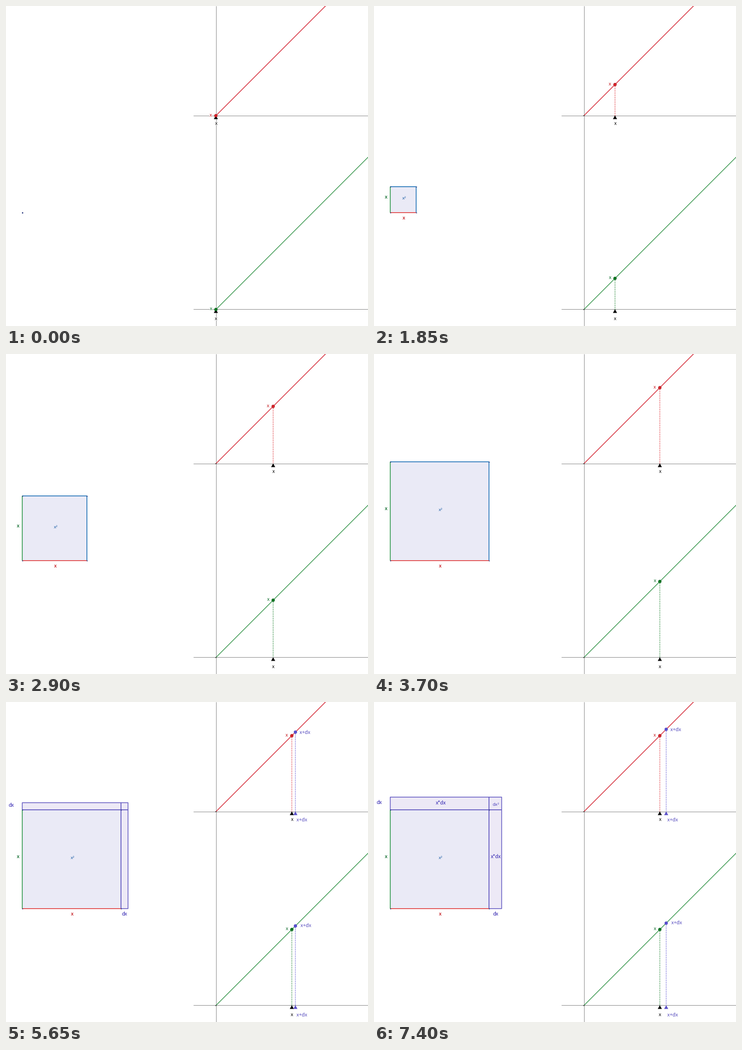
A matplotlib script for the animation above (8 s loop, 796 by 703 pixels).

```python
import matplotlib.pyplot as plt
from matplotlib import patheffects
from matplotlib.animation import FuncAnimation
from matplotlib.patches import Circle, Polygon, Rectangle

W, H, DPI = 796, 703, 64
PT = 72 / DPI                        # points per pixel
STEP, FRAMES, HOLD = 50, 160, 12     # ms, frames per loop, still frames at the start
LAST = 136                           # last moving step

AXIS_X = 461.5
BASES = (241.0, 666.8)               # baselines of the two graphs
SQ_X, SQ_Y = 35.7, 453.9             # lower left corner of the square
X_MAX, X_STEPS = 167.0, 61
DX_MAX, DX_START, DX_STEPS = 14.0, 74, 48

RED, GREEN, BLUE, VIOLET = "#dc2329", "#0f7a22", "#1a6fb5", "#5146bd"
RED_TEXT, GREEN_TEXT, BLUE_TEXT = "#c41a20", "#0b6a2a", "#1d5fa6"
AXIS = "#828282"

plt.rcParams["font.family"] = "Noto Sans CJK JP"
plt.rcParams["text.hinting"] = "none"

fig = plt.figure(figsize=(W / DPI, H / DPI), dpi=DPI, facecolor="white")
ax = fig.add_axes([0, 0, 1, 1])
ax.set_xlim(0, W)
ax.set_ylim(H, 0)
ax.axis("off")


def line(color, width, z, xs=(), ys=(), snap=False, **kw):
    kw.setdefault("solid_capstyle", "butt")
    return ax.plot(xs, ys, color=color, lw=width * PT, zorder=z, snap=snap, **kw)[0]


def label(text, color, ha="center", halo=False, size=10.8, **kw):
    t = ax.text(0, 0, text, color=color, ha=ha, va="baseline",
                fontsize=size * PT, zorder=9, **kw)
    if halo:
        t.set_path_effects([patheffects.withStroke(linewidth=2.5 * PT,
                                                   foreground="white")])
    return t


def squared(text, color, ha="center"):
    return label(text, color, ha, size=9.4, family="DejaVu Sans")


def side(u):
    """Side of the square for a distance u along the graph."""
    return 0.1006 * u ** 1.5


class Marker:
    """Point on a graph with its dotted drop line, triangle and labels."""

    def __init__(self, base, color, edge, tri_color, z):
        self.base = base
        self.drop = line(color, 1.6, z, ls=(0, (1, 1.45)))
        self.tri = ax.add_patch(Polygon([(0, 0)] * 3, color=tri_color, lw=0, zorder=z + 1))
        self.dot = ax.add_patch(Circle((0, 0), 3.2, fc=color, ec=edge,
                                       lw=0.8 * PT, zorder=z + 2))

    def add_labels(self, text, color, foot_color, offset, foot, ha):
        self.text = label(text, color, ha, True)
        self.foot = label(text, foot_color, ha, True)
        self.offset, self.foot_offset = offset, foot

    def place(self, u, shown=True):
        x, b = AXIS_X + u, self.base
        y = b - u
        self.drop.set_data([x, x], [y, b])
        self.tri.set_xy([(x, b - 0.6), (x - 4.5, b + 7.5), (x + 4.5, b + 7.5)])
        self.dot.center = x, y
        self.text.set_position((x + self.offset[0], y + self.offset[1]))
        self.foot.set_position((x + self.foot_offset[0], b + self.foot_offset[1]))
        for part in (self.drop, self.tri, self.dot, self.text, self.foot):
            part.set_visible(shown)


# Axes and diagonals
line(AXIS, 1, 1, [AXIS_X, AXIS_X], [0, H], snap=True)
for base, color in zip(BASES, ("#d62f3c", "#3f9a53")):
    row = base - 0.4
    line(AXIS, 1, 1, [412, W], [row, row], snap=True)
    line(color, 1.6, 2, [AXIS_X, AXIS_X + 400], [base, base - 400])
    ax.add_patch(Circle((AXIS_X, base), 1.1, color="#222222", lw=0, zorder=3))

# Markers at x and at x+dx
top_x = Marker(BASES[0], RED, "#a3141a", "black", 4)
top_x.add_labels("x", RED_TEXT, "black", (-11.2, 2), (1, 20.2), "center")
low_x = Marker(BASES[1], GREEN, "#07591a", "black", 4)
low_x.add_labels("x", GREEN_TEXT, "black", (-10.6, 1.4), (0.3, 23.3), "center")
top_dx = Marker(BASES[0], "#5a50d2", "#4a41c0", "#5a50c8", 5)
top_dx.add_labels("x+dx", VIOLET, VIOLET, (9.2, 4), (2.4, 21.2), "left")
low_dx = Marker(BASES[1], "#5a50d2", "#4a41c0", "#5a50c8", 5)
low_dx.add_labels("x+dx", VIOLET, VIOLET, (11.3, 2.4), (2.4, 23.9), "left")

# Growing square
outer = ax.add_patch(Rectangle((0, 0), 0, 0, fc="#ede9f6", lw=0, zorder=2))
inner = ax.add_patch(Rectangle((0, 0), 0, 0, fc="#eaeaf6", lw=0, zorder=3))
outer_edge = line("#6a60c4", 1.7, 4)
right_edge = line(BLUE, 1.7, 5)
top_edge = line(BLUE, 1.7, 5)
left_edge = line("#2c9648", 1.7, 5)
bottom_edge = line("#e03a3a", 1.7, 5)
corners = line("#24327a", 0, 6, marker="s", ms=1.9 * PT, mew=0, ls="none")

side_x = label("x", GREEN_TEXT)
base_x = label("x", RED_TEXT)
area = squared("x²", BLUE_TEXT, "left")
side_dx = label("dx", VIOLET, "left")
base_dx = label("dx", VIOLET)
strip_top = label("x*dx", VIOLET)
strip_right = label("x*dx", VIOLET)
corner_dx = squared("dx²", VIOLET)


def put(text, x, y, shown):
    text.set_position((x, y))
    text.set_visible(shown)


def draw(i):
    k = min(max(i - HOLD, 0), LAST)
    u = X_MAX * min(k / X_STEPS, 1)
    du = DX_MAX * min(max((k - DX_START) / DX_STEPS, 0), 1)
    grown = du > 0

    for m in (top_x, low_x):
        m.place(u)
    for m in (top_dx, low_dx):
        m.place(u + du, grown)

    s, full = side(u), side(u + du)
    d = full - s
    x1, y1 = SQ_X + s, SQ_Y - s
    x2, y2 = SQ_X + full, SQ_Y - full
    mx, my = SQ_X + s / 2, SQ_Y - s / 2
    sx, sy = x1 + d / 2, y1 - d / 2

    inner.set_bounds(SQ_X, y1, s, s)
    outer.set_bounds(SQ_X, y2, full, full)
    outer_edge.set_data([SQ_X, SQ_X, x2, x2, x1], [y1, y2, y2, SQ_Y, SQ_Y])
    for part in (outer, outer_edge):
        part.set_visible(grown)

    right_edge.set_data([x1, x1], [SQ_Y, y2])
    top_edge.set_data([SQ_X, x2], [y1, y1])
    left_edge.set_data([SQ_X, SQ_X], [SQ_Y, y1])
    bottom_edge.set_data([SQ_X, x1], [SQ_Y, SQ_Y])
    for edge in (right_edge, top_edge):
        edge.set_color("#544abb" if grown else BLUE)
    corners.set_data([SQ_X, x1, SQ_X, x1], [SQ_Y, SQ_Y, y1, y1])

    put(side_x, 25.6, my - 2.2, s > 3)
    put(base_x, mx + 0.9, SQ_Y + 15, s > 3)
    put(area, mx - 2.2, my - 0.2, s > 16)
    put(side_dx, 5.6, sy + 1.7, grown)
    put(base_dx, sx + 0.5, SQ_Y + 16.2, grown)
    roomy = d > 22
    put(strip_top, mx + 2.4, sy + 2.6, roomy)
    put(strip_right, sx + 0.4, my - 1.6, roomy)
    put(corner_dx, sx + 1.8, sy + 5.2, roomy)
    return []


anim = FuncAnimation(fig, draw, frames=FRAMES, interval=STEP,
                     repeat=True, repeat_delay=0, blit=False)
plt.show()
```
